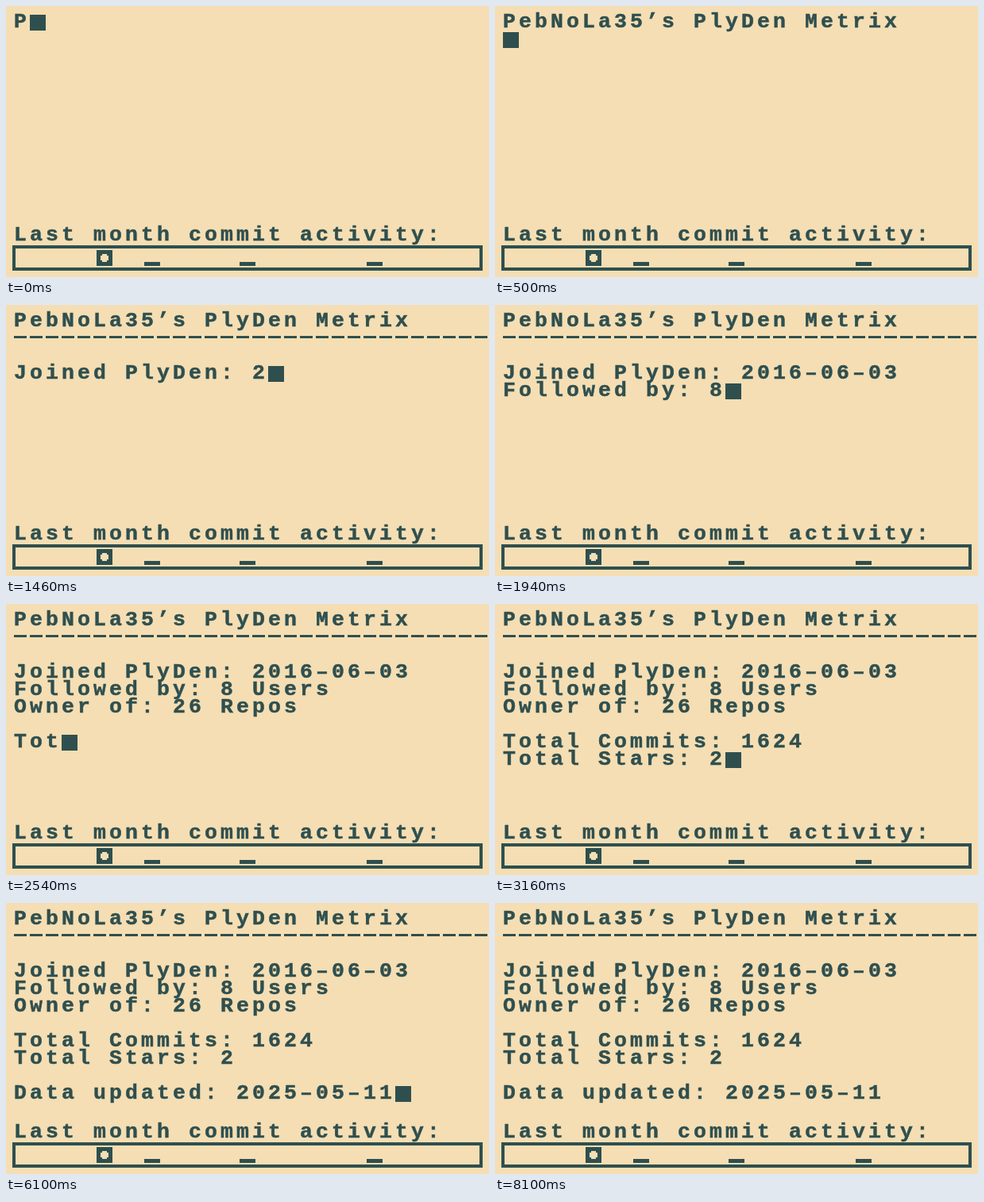
Animation of 608 by 342 pixels, one loop 8.5 s. Source, as an HTML page:

```html
<!DOCTYPE html>
<html lang="en">
<head>
<meta charset="utf-8">
<title>Metrix terminal</title>
<style>
  :root { --ink: #2f4f4f; --paper: #f5deb3; }
  html, body { margin: 0; width: 100%; height: 100%; overflow: hidden; background: var(--paper); }
  .stage { position: relative; width: 608px; height: 342px; overflow: hidden; }
  .stage * { position: absolute; box-sizing: border-box; margin: 0; }
  pre {
    left: 10px;
    font: bold 26.5px/22px "Liberation Mono", "Courier New", monospace;
    letter-spacing: calc(20px - 1ch);
    font-variant-ligatures: none;
    color: var(--ink);
    -webkit-text-stroke: .5px var(--ink);
    white-space: pre;
  }
  #screen { top: 9px; }
  #label { top: 278px; }
  #rule {
    left: 10px; top: 39px; height: 3px;
    background: repeating-linear-gradient(90deg, var(--ink) 0 16px, transparent 16px 20px);
  }
  #cursor { width: 20px; height: 20px; background: var(--ink); }
  .graph { left: 8px; top: 302px; width: 592px; height: 32px; border: 4px solid var(--ink); }
  .graph i { left: calc(2px + 20px * var(--day)); top: 17px; width: 20px; height: 5px; background: var(--ink); }
  .graph .peak {
    top: 2px; height: 20px;
    background:
      linear-gradient(var(--paper) 0 0) center / 10px 6px no-repeat,
      linear-gradient(var(--paper) 0 0) center / 6px 10px no-repeat,
      var(--ink);
  }
</style>
</head>
<body>
<div class="stage">
  <pre id="screen"></pre>
  <div id="rule"></div>
  <div id="cursor"></div>
  <pre id="label">Last month commit activity:</pre>
  <div class="graph">
    <i class="peak" style="--day:5"></i>
    <i style="--day:8"></i>
    <i style="--day:14"></i>
    <i style="--day:22"></i>
  </div>
</div>
<script>
  const LOOP = 8500, KEY = 20, BLINK = 400, CELL = 20, ROW = 22;

  const text = [
    "PebNoLa35’s PlyDen Metrix",
    "-".repeat(30),
    "",
    "Joined PlyDen: 2016–06–03",
    "Followed by: 8 Users",
    "Owner of: 26 Repos",
    "",
    "Total Commits: 1624",
    "Total Stars: 2",
    "",
    "Data updated: 2025–05–11"
  ].join("\n");

  const typingEnd = text.length * KEY;
  const [screenEl, rule, cursor] = ["screen", "rule", "cursor"].map(id => document.getElementById(id));
  let shown = -1;

  function type(count) {
    const lines = text.slice(0, count).split("\n");
    const row = lines.length - 1;
    cursor.style.left = 10 + lines[row].length * CELL + "px";
    cursor.style.top = 11 + row * ROW + "px";
    // The second line is drawn as a dashed rule.
    rule.style.width = (row ? lines[1].length : 0) * CELL + "px";
    if (row) lines[1] = "";
    screenEl.textContent = lines.join("\n");
  }

  function draw(now) {
    const t = now % LOOP;
    const count = Math.min(Math.floor(t / KEY) + 1, text.length);
    if (count !== shown) type(shown = count);
    const off = t >= typingEnd && Math.floor((t - typingEnd) / BLINK) % 2 === 1;
    cursor.style.visibility = off ? "hidden" : "visible";
  }

  const start = performance.now();
  function tick() {
    draw(performance.now() - start);
    requestAnimationFrame(tick);
  }
  tick();
</script>
</body>
</html>
```
